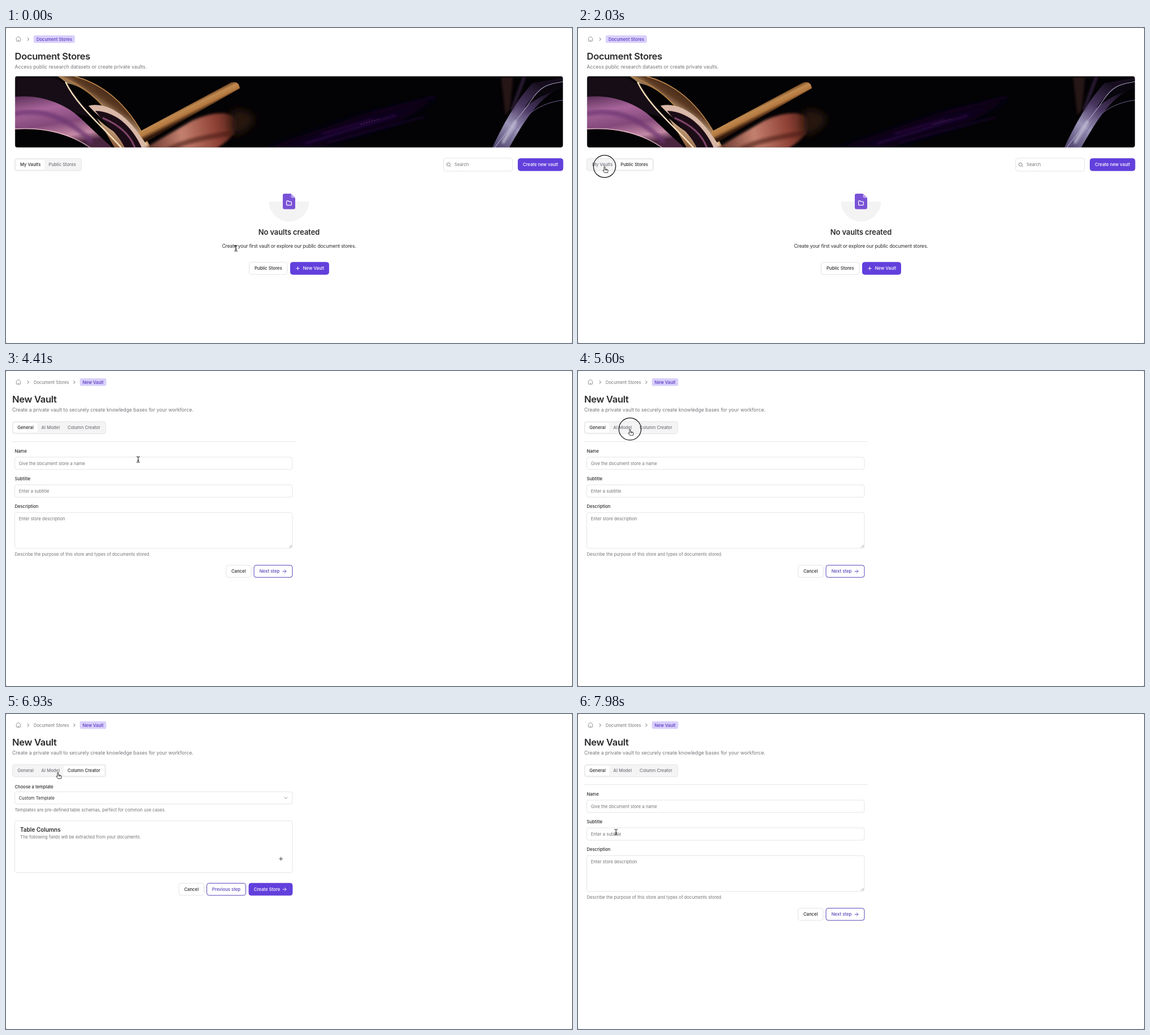
Write an HTML page that moves like this. It is 1002 px wide and 559 px high and loops after 8 s.

```html
<!DOCTYPE html>
<html lang="en">
<head>
<meta charset="utf-8">
<title>Document Stores</title>
<style>
html, body { margin: 0; width: 100%; height: 100%; overflow: hidden; background: #8a8a8a; }
svg { display: block; width: 100vw; height: 100vh; font-family: Inter, Roboto, sans-serif; }
text { white-space: pre; }
</style>
</head>
<body>
<svg id="stage" viewBox="0 0 1002 559">
  <defs>
    <clipPath id="bannerClip"><rect x="16" y="85.5" width="970" height="126.5" rx="4"/></clipPath>
    <filter id="soft"><feGaussianBlur stdDeviation="2"/></filter>
    <filter id="glow" x="-30%" y="-50%" width="160%" height="200%"><feGaussianBlur stdDeviation="7"/></filter>
    <linearGradient id="mauve" x1="0" y1="0" x2=".3" y2="1">
      <stop offset="0" stop-color="#5b2f58"/><stop offset=".3" stop-color="#a8659b"/>
      <stop offset=".6" stop-color="#84497a"/><stop offset=".85" stop-color="#c58aa6"/><stop offset="1" stop-color="#4a2540"/>
    </linearGradient>
    <linearGradient id="gold" x1="0" y1="1" x2=".8" y2=".1">
      <stop offset="0" stop-color="#120810"/><stop offset=".35" stop-color="#8a5a3a"/>
      <stop offset=".55" stop-color="#e6c8a2"/><stop offset=".7" stop-color="#5d3a22"/><stop offset="1" stop-color="#0c0605"/>
    </linearGradient>
    <linearGradient id="pipe" gradientUnits="userSpaceOnUse" x1="315" y1="138" x2="325" y2="158">
      <stop offset="0" stop-color="#6e4420"/><stop offset=".3" stop-color="#c08a50"/>
      <stop offset=".65" stop-color="#b4783f"/><stop offset="1" stop-color="#2f170b"/>
    </linearGradient>
    <linearGradient id="ember" gradientUnits="userSpaceOnUse" x1="250" y1="200" x2="425" y2="165">
      <stop offset="0" stop-color="#6a3a30"/><stop offset=".35" stop-color="#c4806e"/>
      <stop offset=".7" stop-color="#8d4034"/><stop offset="1" stop-color="#2a130b"/>
    </linearGradient>
    <linearGradient id="glass" gradientUnits="userSpaceOnUse" x1="865" y1="212" x2="945" y2="100">
      <stop offset="0" stop-color="#4a4168"/><stop offset=".35" stop-color="#9c94b8"/>
      <stop offset=".65" stop-color="#493660"/><stop offset="1" stop-color="#150d1c"/>
    </linearGradient>
  </defs>
  <rect width="1002" height="559" rx="2" fill="#fff"/>
  <g id="page"></g>
  <circle id="ring" r="19.7" fill="none" stroke="#111" stroke-width="1.2"/>
  <g id="cursor"></g>
</svg>
<script>
const $ = id => document.getElementById(id);
const INK = '#2b2b2f', GREY = '#75757c', LINE = '#e4e4e7', PURPLE = '#6140dc', DEEP = '#5a43b8';

// Text is placed by its vertical centre.
const text = (x, cy, str, { size = 7.65, weight = 400, fill = INK, anchor = 'start', spacing = 0 } = {}) =>
  `<text x="${x}" y="${cy + size * .36}" font-size="${size}" font-weight="${weight}" fill="${fill}" text-anchor="${anchor}" letter-spacing="${spacing}em">${str}</text>`;
const box = (x1, y1, x2, y2, fill = '#fff', stroke = LINE, r = 4) =>
  `<rect x="${x1}" y="${y1}" width="${x2 - x1}" height="${y2 - y1}" rx="${r}" fill="${fill}" stroke="${stroke}"/>`;
const path = (d, stroke, width = .9, fill = 'none', extra = '') =>
  `<path d="${d}" fill="${fill}" stroke="${stroke}" stroke-width="${width}" stroke-linecap="round" stroke-linejoin="round" ${extra}/>`;
const shape = (d, fill, extra = '') => `<path d="${d}" fill="${fill}" ${extra}/>`;
const note = (x, y, str) => text(x, y, str, { fill: GREY });
const label = (y, str) => text(15.5, y, str, { weight: 500 });
const arrow = (x, y, color) => path(`M${x - 3} ${y}h6m-2.8-2.8l2.8 2.8l-2.8 2.8`, color);
const plus = (x, y, color) => path(`M${x - 3} ${y}h6m-3-3v6`, color);
const divider = y => path(`M11 ${y}H512`, LINE, 1);

function button(x1, x2, y, str, style = 'plain', icon = '') {
  const [fill, stroke, color] = {
    plain: ['#fff', LINE, INK], outline: ['#fff', DEEP, DEEP],
    solid: [PURPLE, PURPLE, '#fff'], hover: ['#7658e2', '#7658e2', '#fff'],
  }[style];
  const mid = (x1 + x2) / 2, shift = { plus: 7, arrow: -6.5 }[icon] || 0;
  return box(x1, y, x2, y + 21.5, fill, stroke) +
    text(mid + shift, y + 10.8, str, { size: 7.75, weight: 500, fill: color, anchor: 'middle' }) +
    (icon === 'plus' ? plus(x1 + 13, y + 10.8, color) : icon ? arrow(x2 - 14, y + 10.8, color) : '');
}

const tabs = (x1, x2, y, items, active) => box(x1, y, x2, y + 21.5, '#f4f4f5') +
  items.map(([a, b, str], i) =>
    (i === active ? box(a, y + 2.3, b, y + 19.2, '#fff', 'none', 3) : '') +
    text((a + b) / 2, y + 10.8, str, { size: 7.7, weight: 500, fill: i === active ? INK : GREY, anchor: 'middle' })).join('');

const chevron = x => path(`M${x - 1.2} 17.5l2.4 2.4l-2.4 2.4`, '#52525b');
const home = path('M18.3 18.8q0-.8.6-1.3l2.3-1.8q.8-.5 1.6 0l2.3 1.8q.6.5.6 1.3v3.4q0 1.4-1.4 1.4h-4.6q-1.4 0-1.4-1.4z M20.8 21.7q1.2.7 2.4 0', GREY, .8) + chevron(39.3);
const crumb = (x1, x2, str) => box(x1, 13, x2, 26.5, '#d9d0fb', 'none', 3) +
  text((x1 + x2) / 2, 19.8, str, { weight: 500, fill: '#5838c0', anchor: 'middle' });
const heading = (x, title, sub) =>
  text(x, 49.8, title, { size: 16.6, weight: 600, spacing: -.02 }) + text(x, 69.3, sub, { size: 8.73, fill: GREY });

const banner = `<g clip-path="url(#bannerClip)"><rect x="16" y="85" width="970" height="128" fill="#030204"/>` +
  shape('M16 86H80C115 98 135 128 155 160L16 125z', '#150a18', 'filter="url(#soft)"') +
  shape('M16 122C60 117 105 134 132 160S180 205 188 212H148C110 186 60 176 16 180z', 'url(#mauve)') +
  path('M16 179C65 176 112 186 150 213', '#f0c6cf', 1.4, 'none', 'opacity=".8"') +
  path('M16 152C65 142 110 160 150 200', '#6d3572', 9, 'none', 'filter="url(#soft)" opacity=".7"') +
  shape('M92 86H126C182 102 226 150 256 212H192C166 166 136 116 92 86z', 'url(#gold)') +
  shape('M108 98C150 106 187 150 207 193C172 175 135 140 108 98z', '#050304') +
  path('M106 97C126 138 168 172 204 212', '#f6dcb8', 2.6) +
  path('M95 86C150 106 190 150 217 212', '#b98242', 1.8) +
  shape('M146 138C188 128 228 170 250 212H214C200 184 170 164 146 138z', '#d9b8a8') +
  shape('M158 147C200 148 228 184 240 212H210C198 186 176 172 158 147z', '#1c0c16') +
  path('M172 160C200 172 220 190 228 212', '#7d4468', 3) +
  path('M122 86C184 103 226 150 254 212', '#c58c50', 1.3) +
  shape('M244 214L330 164C380 142 415 150 408 176Q402 196 372 214z', 'url(#ember)', 'filter="url(#soft)"') +
  shape('M400 145C452 142 452 178 400 192z', '#251308', 'filter="url(#glow)"') +
  path('M290 214C330 196 370 192 400 186', '#4a1e18', 9, 'none', 'filter="url(#soft)" opacity=".6"') +
  shape('M234 185L398 97Q412 93 414 107L246 203z', 'url(#pipe)') +
  shape('M450 216L640 150L770 122L690 170L540 216z', '#10061b', 'filter="url(#glow)"') +
  [[530, 205, 690, 155, '#2b1145'], [570, 203, 740, 158, '#190e2a'], [560, 188, 650, 162, '#2c103c'], [650, 150, 760, 122, '#150820']]
    .map(([a, b, c, d, color]) => path(`M${a} ${b}L${c} ${d}`, color, 3, 'none', 'filter="url(#soft)"')).join('') +
  path('M628 171L662 161', '#6b3f80', .8, 'none', 'stroke-dasharray="2 3"') +
  shape('M876 86H898L892 145L884 155z', '#251918', 'filter="url(#soft)"') +
  shape('M860 214C880 172 902 130 932 98L986 88V104C945 122 920 160 890 214z', 'url(#glass)') +
  shape('M918 142C936 112 960 98 986 92V108C956 114 934 128 918 142z', '#09060d') +
  path('M864 214C888 180 910 158 930 128S965 100 986 95', '#a79cc0', 1.2) +
  path('M886 212C905 165 935 134 986 128', '#6f6290', 1) +
  path('M880 203L902 166', '#c9c5da', 4, 'none', 'filter="url(#soft)"') +
  path('M918 86L896 145', '#3b2648', 4, 'none', 'filter="url(#soft)"') +
  `</g><rect x="15.7" y="85.2" width="970.6" height="127.1" rx="4" fill="none" stroke="${LINE}" stroke-width=".8"/>`;

const stores = (tab, vaultStyle = 'solid') =>
  home + crumb(49, 122, 'Document Stores') +
  heading(15.5, 'Document Stores', 'Access public research datasets or create private vaults.') + banner +
  tabs(15.5, 133.5, 231.7, [[18, 68.3, 'My Vaults'], [68.3, 131, 'Public Stores']], tab) +
  box(774.7, 231, 896.7, 254) + path('M785.8 244.8l1.2 1.2M780.3 242.2a3 3 0 1 0 6 0a3 3 0 1 0-6 0', GREY) +
  note(794, 242.5, 'Search') + button(906.5, 986, 231.7, 'Create new vault', 'solid') +
  shape('M465.5 308H536.5A35.5 35.5 0 0 1 465.5 308z', '#f3f3f4') +
  shape('M493 294H504.5L512 301.5V318.5Q512 321.5 509 321.5H493Q490 321.5 490 318.5V297Q490 294 493 294z', '#7952d6') +
  shape('M504.5 294L512 301.5H506.5Q504.5 301.5 504.5 299.5z', '#b8a1ee') +
  path('M496.7 307.6q0-1 1-1h2l1.4 1.5h3.2q1 0 1 1v4.3q0 1-1 1h-6.6q-1 0-1-1z', '#fff', 1.2) +
  text(501, 362, 'No vaults created', { size: 12.9, weight: 600, anchor: 'middle', spacing: -.005 }) +
  text(501, 386.6, 'Create your first vault or explore our public document stores.', { size: 8.62, anchor: 'middle', spacing: -.02 }) +
  button(430.5, 498, 415.8, 'Public Stores') + button(503.5, 571.5, 415.8, 'New Vault', vaultStyle, 'plus');

const vault = (tab, body) =>
  home + text(49, 19.8, 'Document Stores', { fill: GREY }) + chevron(121) + crumb(130.7, 177.5, 'New Vault') +
  heading(11, 'New Vault', 'Create a private vault to securely create knowledge bases for your workforce.') +
  tabs(11.5, 176.7, 89.8, [[13.5, 55.7, 'General'], [55.7, 102, 'AI Model'], [102, 174, 'Column Creator']], tab) + body;

const general = divider(125.2) +
  label(142, 'Name') + box(15.5, 152.8, 507, 174.7) + note(22.7, 164, 'Give the document store a name') +
  label(191, 'Subtitle') + box(15.5, 202, 507, 224) + note(22.7, 213, 'Enter a subtitle') +
  label(240.3, 'Description') + box(15.5, 251.2, 507, 314.8) + note(22.7, 262, 'Enter store description') +
  path('M501.5 313l4-4M504 313l1.5-1.5', GREY, .7) +
  note(15.5, 325, 'Describe the purpose of this store and types of documents stored.') +
  button(389.5, 434, 344.7, 'Cancel') + button(439, 507, 344.7, 'Next step', 'outline', 'arrow');

const models = [
  { maker: 'Velthoric', pill: 100, name: 'Tarvel V3.5 Ballad', price: '13.40', priceX: 125, mark: '#181818' },
  { maker: 'Ochre DrelAI', pill: 113, name: 'Ochre TRN-4x', price: '15.00', priceX: 104, mark: '#1b7fc9', best: true },
  { maker: 'Subsoil', pill: 96, name: 'subsoil/tarvel-3-5-ballad', price: '13.40', priceX: 156, mark: '#242430' },
  { maker: 'DrelAI', pill: 92.5, name: 'TRN-4x', price: '15.00', priceX: 80, mark: '#6b6b70', best: true, chosen: true },
];
function modelCard(m, i) {
  const y = 203.7 + i * 51.8, row = y + 15.3;
  return box(15.5, y, 507, y + 46.5, '#fff', m.chosen ? DEEP : LINE) +
    `<circle cx="29.3" cy="${row}" r="4.4" fill="${m.chosen ? PURPLE : '#fff'}" stroke="${DEEP}"/>` +
    (m.chosen ? path(`M27.3 ${row}l1.5 1.5l2.6-2.8`, '#fff', 1) : '') +
    `<circle cx="47" cy="${row}" r="4" fill="${m.mark}"/>` +
    box(56.5, row - 6, m.pill, row + 6, '#fff', LINE, 6) +
    text((56.5 + m.pill) / 2, row, m.maker, { size: 6.6, weight: 600, anchor: 'middle' }) +
    text(42.8, y + 31.7, m.name, { weight: 500 }) +
    note(m.priceX, y + 31.7, `~ $${m.price} USD per 1000 pages`) +
    (m.best ? box(437, row - 6.2, 498, row + 6.2, PURPLE, 'none', 6.2) +
      text(467.5, row, 'Recommended', { size: 6.6, weight: 600, fill: '#fff', anchor: 'middle' }) : '');
}
const model = box(11.5, 125.3, 511.5, 166.3, '#ece8fd', DEEP) +
  path('M21 140.2a4 4 0 1 0 8 0a4 4 0 1 0-8 0M25 140v2.2M25 138.2v.1', DEEP, .8) +
  text(38.3, 140.4, 'This AI model will be used summarize and extract metadata from the documents. The choice of model will affect the quality of', { fill: DEEP }) +
  text(38.3, 151.8, 'the extracted data and also the cost per page.', { fill: DEEP }) +
  divider(176) + label(192.3, 'Model Used') + models.map(modelCard).join('') +
  button(315.7, 360, 419.7, 'Cancel') + button(365, 434, 419.7, 'Previous step', 'outline') +
  button(439, 507, 419.7, 'Next step', 'outline', 'arrow');

const columns = label(129, 'Choose a template') + box(15.5, 138, 507, 159.7) + text(22.7, 148.8, 'Custom Template') +
  path('M493 147.8l2.4 2.4l2.4-2.4', GREY) +
  note(15.5, 170, 'Templates are pre-defined table schemas, perfect for common use cases.') +
  box(15.5, 189.3, 507, 281.5) + text(25, 205, 'Table Columns', { size: 10, weight: 600 }) +
  note(25, 217.8, 'The following fields will be extracted from your documents.') + plus(486.7, 257, INK) +
  button(306, 350.5, 300.3, 'Cancel') + button(355.5, 424.5, 300.3, 'Previous step', 'outline') +
  button(430, 507, 300.3, 'Create Store', 'solid', 'arrow');

const pages = {
  mine: stores(0), hover: stores(0, 'hover'), public: stores(1),
  general: vault(0, general), model: vault(1, model), columns: vault(2, columns),
};
const cursors = {
  arrow: path('M0 0v10.5l2.5-2.3 1.6 3.8 1.8-.8-1.6-3.6h3.5z', '#fff', .8, '#111'),
  hand: path('M-1 1.2a1 1 0 0 1 2 0v3.6l4 .8q1.4.4 1.2 2l-.6 3.6h-5.6l-3-4q.6-1.6 2-.2zM1.8 5v2M3.6 5.4v1.8', '#222', .9, '#fff'),
  beam: path('M-2.5-5q2 0 2.5 1q.5-1 2.5-1M0-4v8M-2.5 5q2 0 2.5-1q.5 1 2.5 1M-1 1.5h2', '#111', 1),
};

const schedule = [[0, 'mine'], [840, 'public'], [2100, 'mine'], [3570, 'general'], [5670, 'model'], [6720, 'columns'], [7420, 'general']];
const clicks = [770, 2030, 3290, 5600, 6650, 7420];
const route = [
  [0, 407, 391], [700, 104, 247], [980, 104, 247], [1470, 47, 247], [1750, 47, 247], [1820, 47, 245.6],
  [2240, 47, 245.6], [2450, 459, 359], [2520, 459, 359], [3150, 530.5, 428], [3850, 530.5, 428],
  [4130, 264, 164], [4340, 264, 164], [4410, 234, 157], [4900, 92, 103], [5670, 92, 103],
  [6020, 130, 102.7], [6230, 137, 102.7], [6650, 137, 102.7], [6930, 92, 103.5], [7350, 33, 103],
  [7420, 33, 103], [7630, 90, 165], [7840, 62.5, 220.5], [7910, 62.5, 220.5], [7980, 67.3, 209.6], [8000, 67.3, 209.6],
];

function pointerAt(t) {
  const i = route.findIndex(([time]) => time > t);
  const [t0, x0, y0] = route[i - 1], [t1, x1, y1] = route[i];
  const k = 1 - (1 - (t - t0) / (t1 - t0)) ** 2;
  return [x0 + (x1 - x0) * k, y0 + (y1 - y0) * k];
}

function cursorKind(page, x, y) {
  const inside = (x1, y1, x2, y2) => x >= x1 && x <= x2 && y >= y1 && y <= y2;
  if (page === 'mine' || page === 'public') {
    if (inside(15, 231, 134, 254) || inside(430, 415, 498, 438) || inside(503, 415, 572, 438)) return 'hand';
    return inside(382, 380, 620, 393) || inside(446, 354, 556, 370) ? 'beam' : 'arrow';
  }
  if (inside(11, 89, 177, 112)) return 'hand';
  const fields = page === 'general' ? [[153, 175], [202, 224], [251, 315]] : [];
  return fields.some(([top, bottom]) => inside(15, top, 507, bottom)) ? 'beam' : 'arrow';
}

let shownPage, shownCursor;
function draw(now) {
  const t = Math.floor(now % 8000 / 70) * 70;
  const [x, y] = pointerAt(t);
  let page = schedule.filter(([start]) => start <= t).pop()[1];
  const kind = cursorKind(page, x, y);
  if (page === 'mine' && kind === 'hand' && x > 503) page = 'hover';
  if (page !== shownPage) $('page').innerHTML = pages[shownPage = page];
  if (kind !== shownCursor) $('cursor').innerHTML = cursors[shownCursor = kind];
  $('cursor').setAttribute('transform', `translate(${x} ${y})`);
  $('ring').setAttribute('transform', `translate(${x} ${y})`);
  $('ring').setAttribute('visibility', clicks.includes(t) ? 'visible' : 'hidden');
}
const start = performance.now();
function tick() {
  draw(performance.now() - start);
  requestAnimationFrame(tick);
}
tick();
</script>
</body>
</html>
```
